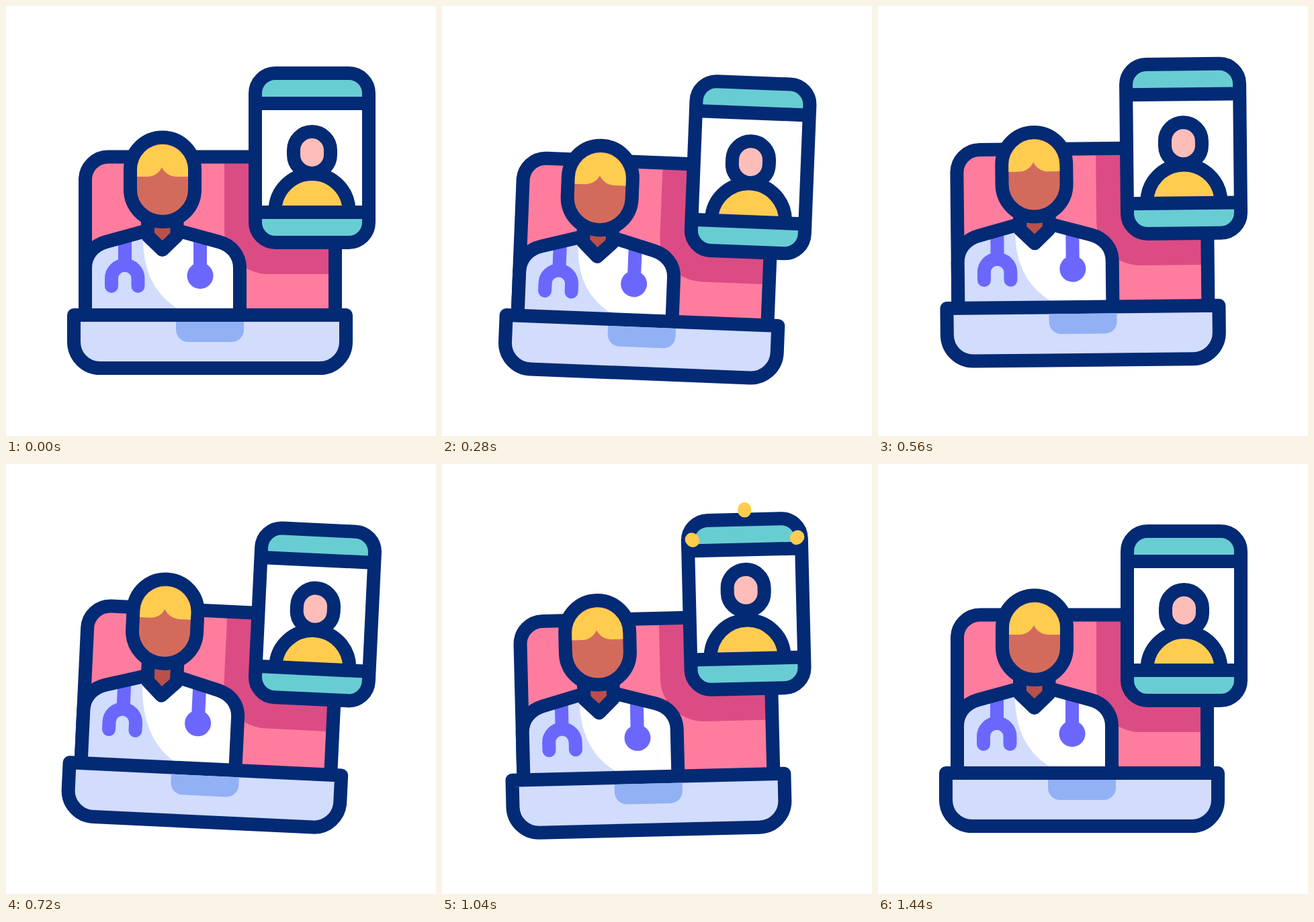
Animation, 640 px wide and 640 px high, one loop 1.6 s. Source, as an HTML page:

```html
<!DOCTYPE html>
<html lang="en">
<head>
<meta charset="utf-8">
<title>Online doctor</title>
<style>
html, body { margin: 0; height: 100%; overflow: hidden; background: #fff; }
svg { display: block; width: 100%; height: 100%; }
.line { fill: none; stroke: #032a74; stroke-width: 20; stroke-linejoin: round; }
.tube { fill: none; stroke: #6b67fd; stroke-width: 20; }
#sparks { stroke: #ffcc50; stroke-width: 20; stroke-linecap: round; }
</style>
</head>
<body>
<svg viewBox="0 0 640 640">
  <clipPath id="screen"><rect x="118" y="224.5" width="372" height="240" rx="34"/></clipPath>
  <g id="all">
    <g clip-path="url(#screen)">
      <path fill="#fe7d9f" d="M118 220H490V470H118z"/>
      <path id="shadow" fill="#db4c84" d="M325 150V334a65 65 0 0 0 65 65H500V150z"/>
    </g>
    <path class="line" d="M118 470V258.500a34 34 0 0 1 34-34H456a34 34 0 0 1 34 34V470"/>

    <g id="torso">
      <path fill="#fff" d="M118 500V390C118 370 131 356 149 351L211 334H254.500L317 351C335 356 348 370 348 390V500z"/>
      <path id="shade" fill="#d2dcfd"/>
      <path class="tube" d="M177 345V385M289 345V390"/>
      <path class="tube" stroke-linecap="round" d="M157 417V405.500a19.750 19.750 0 0 1 39.500 0V417"/>
      <circle cx="289" cy="401.500" r="19.500" fill="#6b67fd"/>
      <path class="line" d="M118 500V390C118 370 131 356 149 351L211 334M254.500 334L317 351C335 356 348 370 348 390V500"/>
      <path class="line" style="fill:#b9504a" d="M211 285V342L232.750 363L254.500 342V285"/>
    </g>

    <g id="head">
      <rect class="line" style="fill:#d36b5d" x="185" y="195.500" width="96" height="125.500" rx="48"/>
      <path fill="#ffcc50" d="M195 254H210a24 24 0 0 0 22-14a24 24 0 0 0 22 14H271V244a38 38 0 0 0-76 0z"/>
    </g>

    <path class="line" style="fill:#d2dcfd" d="M101 460H506V500a39 39 0 0 1-39 39H140a39 39 0 0 1-39-39z"/>
    <path fill="#92b1f4" d="M253 470H354V482a18 18 0 0 1-18 18H271a18 18 0 0 1-18-18z"/>

    <g id="phone">
      <rect x="371" y="100" width="169" height="252" rx="30" fill="#68cdd2"/>
      <path fill="#fff" d="M371 145H540V307H371z"/>
      <path class="line" style="fill:#ffcc50" d="M400.500 307V305a55 55 0 0 1 110 0V307"/>
      <rect id="face" class="line" style="fill:#febdb9" x="428" y="187" width="55" height="62" rx="27.500"/>
      <path class="line" d="M371 145H540M371 307H540"/>
      <rect class="line" x="371" y="100" width="169" height="252" rx="30"/>
      <path id="sparks"/>
    </g>
  </g>
</svg>
<script>
const LOOP = 1600, STEP = 40;
const $ = id => document.getElementById(id);

// Eased value of a track of [time, value] keys
function track(t, keys) {
  if (t <= keys[0][0]) return keys[0][1];
  for (let i = 1; i < keys.length; i++) {
    const [t0, a] = keys[i - 1], [t1, b] = keys[i];
    if (t < t1) {
      const p = (t - t0) / (t1 - t0);
      return a + (b - a) * p * p * (3 - 2 * p);
    }
  }
  return keys[keys.length - 1][1];
}

const tilt = [0, 3, -3, 3, -3, 0].map((angle, i) => [i * 230, angle]);
const jump = [[0, 0], [400, 11.2], [600, -15], [900, 13], [1150, 0]];
const torso = [[160, 0], [420, 10.5], [720, -9], [1000, 0]];
const head = [[160, 0], [430, 16.5], [730, -15], [1040, 0]];
const phone = [[670, 0], [920, -33.5], [1190, 0]];
const face = [[700, 0], [940, -16], [1280, 0]];
const sparkFront = [[1010, 0], [1240, 1]];
const sparkBack = [[1110, 0], [1350, 1]];
// Start point and travel of each spark
const sparks = [[456.5, 87, 0, -54], [378.5, 129.5, -36, -36], [533, 129.5, 36, -36]];

const shift = (id, y) => $(id).setAttribute("transform", `translate(0 ${y})`);

function draw(t) {
  $("all").setAttribute("transform",
    `translate(0 ${track(t, jump)}) rotate(${track(t, tilt)} 320 320)`);
  shift("head", track(t, head));
  shift("phone", track(t, phone));
  shift("shadow", track(t, phone));
  shift("face", track(t, face));

  // The lower end of the coat's shade stays on the laptop
  const y = track(t, torso);
  shift("torso", y);
  $("shade").setAttribute("d", "M118 390C118 370 131 356 149 351L204 336" +
    `C202 395 222 ${430 - y} 258 ${452 - y}V500H118z`);

  const front = track(t, sparkFront), back = track(t, sparkBack);
  $("sparks").setAttribute("d", front > back ? sparks.map(([x, y, dx, dy]) =>
    `M${x + dx * back} ${y + dy * back}L${x + dx * front} ${y + dy * front}`).join("") : "");
}

function frame() {
  const t = performance.now() % LOOP;
  draw(Math.floor(t / STEP) * STEP);
  requestAnimationFrame(frame);
}
frame();
</script>
</body>
</html>
```
